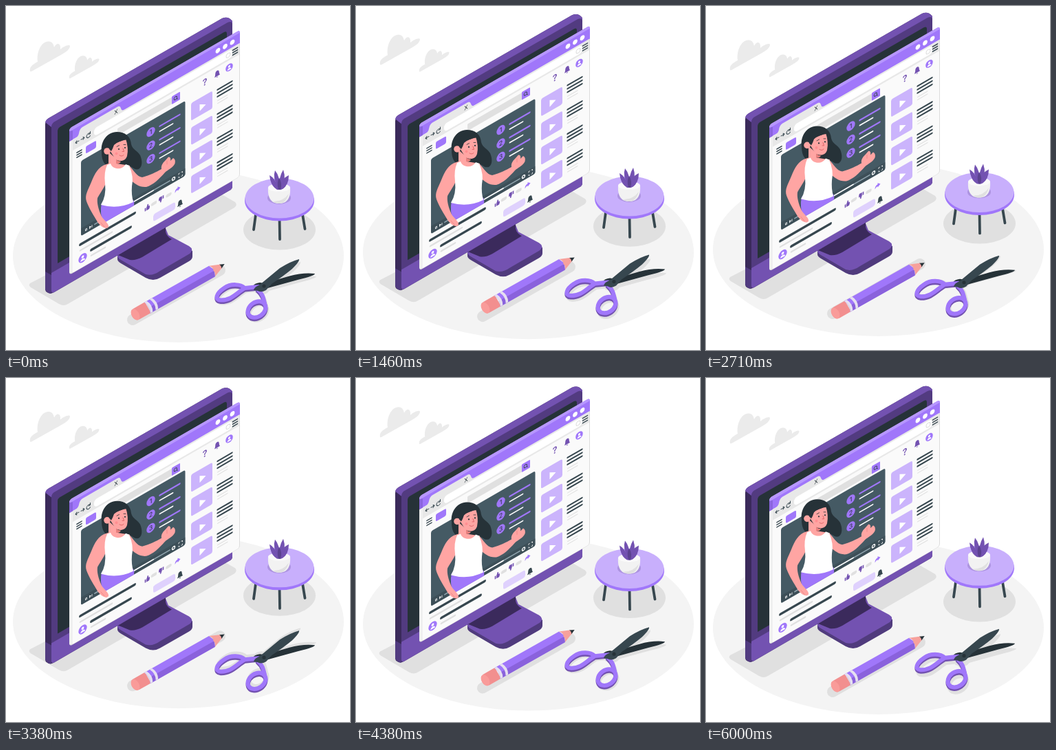
Write an HTML page that moves like this. It is 500 px wide and 500 px high and loops after 6040 ms.

```html
<!DOCTYPE html>
<html lang="en">
<head>
<meta charset="utf-8">
<title>Video tutorial</title>
<style>
  html, body { margin: 0; width: 100%; height: 100%; overflow: hidden; background: #fff; }
  svg { display: block; width: 100vw; height: 100vh; }
  text { font-family: Inter, Arial, sans-serif; text-anchor: middle; }
  .line { fill: none; stroke-linecap: round; stroke-linejoin: round; }
  .p { fill: #a077fa; } .mid { fill: #7352b1; } .light { fill: #cbb4fc; }
  .dark { fill: #37474f; } .ink { fill: #263238; } .skin { fill: #ffa5a3; }
  .g { fill: #e0e0e0; } .w { fill: #fff; }
  .sp { stroke: #a077fa; } .sd { stroke: #37474f; } .sg { stroke: #e0e0e0; } .sw { stroke: #fff; }
</style>
</head>
<body>
<svg viewBox="0 0 500 500">
  <defs>
    <path id="cloud" fill="#ebebeb" d="M35 95C34 89 37 86 46 81C44 66 52 51 62 51.500C68 52 69 56 70 60C74 52 80 54 79 63C83 59 92 55 93 58C93 63 87 67 80 71L39 94Q36 96 35 95Z"/>
    <g id="loops" class="line" stroke-width="6">
      <path d="M367 408L347 410C341 404 327 403 317 410C305 418 303 427 312 427.500C328 428 335 417 347 410"/>
      <path d="M366 412C373 418 374 424 376 432"/>
      <ellipse cx="364.500" cy="441" rx="14" ry="10.500" transform="rotate(-35 364.500 441)"/>
    </g>
    <path id="bladeA" d="M360 413Q361 408 369 405L398 381Q414 371 426 368Q427 371 416 382Q404 392 386 404L378 413Q371 417 366 414Z"/>
    <path id="bladeB" d="M359 407Q361 403 369 402L376 403L412 392.500Q432 387 449 389Q449 392 424 398L384 409Q370 414 362 411Z"/>
    <path id="pointer" d="M0 5V-5L9 0Z"/>
    <path id="thumb" d="M-3.300-.500H-1.600V4H-3.300ZM-.800 0L.800-4.300Q2.600-4 2-.800H4Q4.200 2.500 3 4H-.800Z"/>
    <path id="bell" d="M-4 3Q-2.800 1-2.800-1Q-2.800-5 0-5Q2.800-5 2.800-1Q2.800 1 4 3ZM-1.500 4H1.500Q0 6-1.500 4Z"/>
    <g id="user">
      <circle r="6.200" class="p"/>
      <circle cy="-1.700" r="1.900" class="w"/>
      <path class="w" d="M-3.600 4Q-3 .8 0 .8Q3 .8 3.600 4Z"/>
    </g>
  </defs>

  <!-- floor and shadows -->
  <g data-d="0" data-p="6000">
    <ellipse cx="250.500" cy="363" rx="240.500" ry="126" fill="#f4f4f4"/>
    <path class="g" d="M35 403L300 266L333 285Q337 289 332 293L90 433Q84 437 77 433L36 409Q32 406 35 403Z"/>
    <ellipse cx="397.500" cy="325" rx="52.500" ry="29.500" class="g"/>
    <path class="line sg" stroke-width="16" d="M184 456L311 384"/>
    <g transform="translate(2 4)">
      <use href="#loops" class="sg"/>
      <use href="#bladeA" class="g"/>
      <use href="#bladeB" class="g"/>
    </g>
  </g>

  <g data-d="0">
    <use href="#cloud"/>
    <use href="#cloud" transform="translate(65.750 33.750) scale(.75)"/>
  </g>

  <!-- monitor -->
  <g data-d="750">
    <path fill="#503b7d" d="M162 362V368Q162 371 167 374L203 395Q214 401 224 395L266 371Q271 368 271 364V356L236 334Z"/>
    <path class="mid" d="M162 363L232 323L236 333L266 349Q274 354 267 360L224 385Q213 393 203 390L167 369Q162 366 162 363Z"/>
    <path fill="#3b2a5c" d="M163 362L232 318V328Q233 335 241 339L198 365Q189 370 180 369Z"/>
    <path fill="#3a2a5a" d="M57 172Q57 166 62 163L314 18Q323 14 329 22V262Q329 266 325 268L70 416Q64 420 58 415L57 412Z"/>
    <path class="mid" d="M57 169Q58 165 62 163L314 18Q323 14 329 22V26L66 176Z"/>
    <path fill="#523b80" d="M66 176Q66 171 70 168.500L322 24Q329 21 329 27V262L66 412Z"/>
    <path class="ink" d="M75 181Q75 178 78 176L317 38Q321 36 321 40V232L75 374Z"/>
    <path fill="#513b80" d="M57 386L66 391V418Q60 418 57 412Z"/>
    <path class="mid" d="M66 388L329 236V262Q329 266 325 268L70 416Q66 418 66 414Z"/>
  </g>

  <!-- browser window -->
  <g data-d="500">
    <g transform="translate(92 178) skewY(-30)">
      <rect width="248" height="213" rx="4" fill="#dcdcdc"/>
      <rect x="4" y="4" width="243" height="208.500" rx="3" fill="#fafafa"/>
      <path fill="#f0f0f0" d="M0 15H5V212Q0 212 0 208Z"/>
      <path class="p" d="M0 19V4Q0 0 4 0H244Q248 0 248 4V19Z"/>
      <path fill="#b797ff" d="M0 5Q0 0 4 0H244Q248 0 248 4L5 5Z"/>
      <path fill="#8b65df" d="M0 4L5 6V19H0Z"/>
      <path fill="#e8e8e8" d="M5 19H10Q13 19 14 15Q15 9 19 9H70Q74 9 75 14Q76 19 80 19H247V35H5Z"/>
      <rect x="36" y="21" width="201" height="11.500" rx="5" class="w"/>
      <circle cx="231" cy="27" r="3" fill="none" stroke="#ddd"/>
      <g class="w"><circle cx="216" cy="11.500" r="3.400"/><circle cx="226.500" cy="11.500" r="3.400"/><circle cx="237" cy="11.500" r="3.400"/></g>
      <text x="68" y="18" font-size="8" class="ink">X</text>
      <g class="line sd" stroke-width="1">
        <path d="M14 26H9M11 24L9 26L11 28M17 26H22M20 24L22 26L20 28M30 24A3 3 0 1 0 30.500 28M30.500 22V25H28"/>
      </g>
      <path class="line sd" stroke-width="1.600" d="M237.500 23.500H244.500M237.500 27H244.500M237.500 30.500H244.500M11 41.500H18M11 45H18M11 48.500H18"/>
      <rect x="24" y="40" width="15" height="10.500" rx="2" class="p"/>
      <rect x="70" y="40.500" width="80" height="10" rx="1" class="g"/>
      <rect x="149" y="39.500" width="12" height="11.500" rx="1" class="p"/>
      <path class="line sd" stroke-width=".9" d="M157.500 48L156 46.500A2.200 2.200 0 1 0 155.800 46.700"/>
      <text x="197" y="51" font-size="13" font-weight="600" class="mid">?</text>
      <use href="#bell" x="215" y="45" class="mid"/>
      <use href="#user" transform="translate(232.500 45.500) scale(.85)"/>
      <g id="list"></g>
      <g class="line">
        <path class="sd" stroke-width="3.800" d="M16 178H95M32 195H89"/>
        <path class="sg" stroke-width="2.600" d="M16 186.500H62M32 203H52"/>
        <path class="sg" stroke-width="4.500" d="M121 180H125M142.500 180H146.500"/>
      </g>
      <use href="#user" transform="translate(19.500 199.500)"/>
      <use href="#thumb" x="113" y="180" class="mid"/>
      <use href="#thumb" transform="translate(134 180) rotate(180)" class="mid"/>
      <path class="p" d="M153.500 182.500Q153.500 177.500 157.500 177.500V175.500L161.500 179L157.500 182V180Q155 180 153.500 182.500Z"/>
      <rect x="122" y="195.500" width="32" height="10.500" rx="3" fill="#dfd1fd"/>
      <use href="#bell" x="161" y="202" class="dark"/>
    </g>
  </g>

  <!-- video with presenter -->
  <g data-d="1000">
    <g transform="translate(92 178) skewY(-30)">
      <rect x="17" y="57" width="151.500" height="109" rx="2.500" fill="#455a64"/>
      <path class="dark" d="M17 155H168.500V163.500Q168.500 166 166 166H19.500Q17 166 17 163.500Z" opacity=".55"/>
      <g id="steps"></g>
      <g class="line" stroke-width="1.800">
        <path stroke="#90a4ae" d="M37 160.500H146"/>
        <path class="sw" d="M92 160.500H122"/>
        <circle cx="151.500" cy="160.500" r="2" stroke-width="1.500" class="sw"/>
        <path class="sw" stroke-width=".8" d="M159 159V157.500H160.500M163 157.500H164.500V159M164.500 162V163.500H163M160.500 163.500H159V162M29.500 159.500L31.500 161L29.500 162.500ZM33 159.500V162.500M23.500 160V162.300H25.500V160Z"/>
      </g>
    </g>
    <path class="ink" d="M139 212C137 197 147 183 161 183C174 183 181 190 182 201C184 209 191 210 195 217C198 224 199 233 193 237C187 239 182 233 177 231L150 234C141 230 139 222 139 212Z"/>
    <path class="skin" d="M179 232C186 239 190 248 198 249C209 246 219 241 226 237C225 231 229 227 232 224L236 219.500Q240 219 239 225L243 221Q247 223 245.500 229C243 235 235 238 231 242C222 252 214 260 204 263C194 264 187 258 181 253Z"/>
    <path class="p" d="M139 286L184 281Q187 284 186 290L141 316Q136 300 139 286Z"/>
    <path class="skin" d="M146 230C134 233 129 244 124 256C119 268 114 275 117 284C121 295 128 305 133 314C138 321 146 326 149 321C150 317 143 312 139 306C134 295 132 286 133 279C138 270 143 264 147 253L152 240H177L180 232L161 229L160 222L149 212V229Z"/>
    <path class="w" d="M147 231L152 229C155 238 169 239 174 230L179 232Q186 248 183 262Q182 274 185 285Q163 296 138 289Q146 276 144 258Q142 242 147 231Z"/>
    <path class="skin" d="M151 210C151 199 162 200 174 193Q178.500 206 176 218C174 225 167 227 159 223Z"/>
    <path fill="#e9807e" d="M160 223Q163 226 167 226Q165 230 160 229Z"/>
    <circle cx="147" cy="211" r="4.800" class="skin"/>
    <path class="ink" d="M150 208Q148 194 160 187Q174 186 177 194Q163 196 157 202Q155 208 153 211Z"/>
    <circle cx="164" cy="208" r="1.100" class="ink"/><circle cx="173" cy="206" r="1.100" class="ink"/>
    <circle cx="160.500" cy="214.500" r="2" fill="#ff8e91"/>
    <path class="line" stroke="#263238" stroke-width=".8" d="M161 204.500L164.500 202.500M171 201.500L174 201.500"/>
    <path class="line" stroke="#d85e62" stroke-width=".9" d="M170 207L171.500 211.500H169M165 217Q168.500 219.500 171 216.500"/>
    <path class="line" stroke="#e9807e" stroke-width=".7" d="M234 225L234 230M138 315L143 321"/>
  </g>

  <!-- table and plant -->
  <g data-d="1000">
    <path class="line sd" stroke-width="3.800" d="M363 303L360 325M397.500 308L398 339M431 303L434.500 324"/>
    <ellipse cx="397.500" cy="283" rx="50.500" ry="29.500" class="p"/>
    <ellipse cx="397.500" cy="279.500" rx="50" ry="29" fill="#c8affc"/>
    <ellipse cx="397" cy="279" rx="17" ry="9" fill="#ad94e0"/>
    <path fill="#f2f2f2" d="M381 264C380 280 386 287 397 287C408 287 414 280 413 264Q397 254 381 264Z"/>
    <path fill="#e0e0e0" d="M388 284Q402 285 411 273Q407 287 397 287Q392 287 388 284Z"/>
    <ellipse cx="397" cy="264" rx="16" ry="6" fill="#fafafa"/>
    <g class="mid">
      <path d="M394 266Q384 260 383 246Q391 250 396 265ZM399 266Q398 252 411 246Q411 260 402 266Z"/>
      <path d="M396 266Q387 250 391 239Q398 247 399 266ZM397 266Q396 249 403 238Q408 252 400 266Z"/>
      <path d="M394 267Q386 262 385 254Q394 257 398 267ZM397 267Q399 257 409 254Q408 263 400 267Z"/>
      <path fill="#5b4290" d="M396 267Q393 256 397 250Q402 258 399 267Z"/>
    </g>
  </g>

  <!-- pencil -->
  <g data-d="0">
    <g transform="translate(188 448.500) rotate(-29.500)">
      <path fill="#f28f8f" d="M2-9H21V9H2Q-5 8-5 0Q-5-8 2-9Z"/>
      <ellipse rx="5.500" ry="8.800" fill="#f99b99"/>
      <path class="p" d="M20-9H128L132 0L128 9H20Q25 0 20-9Z"/>
      <path fill="#8a62dc" d="M23 1H131L128 9H20Q23 5 23 1Z"/>
      <path fill="#e6e0f0" d="M20-9H24Q29 0 24 9H20Q25 0 20-9ZM29-9H33Q38 0 33 9H29Q34 0 29-9Z"/>
      <path fill="#f7a19c" d="M128-9L144-2.500V2.500L128 9Q132 4 130 1Q133-4 128-9Z"/>
      <path class="ink" d="M142-3.300L149 0L142 3.300Q144 0 142-3.300Z"/>
    </g>
  </g>

  <!-- scissors -->
  <g data-d="500">
    <use href="#bladeB" class="ink"/>
    <use href="#loops" y="2.500" stroke="#7352b1"/>
    <use href="#loops" class="sp"/>
    <use href="#bladeA" class="dark"/>
    <circle cx="375" cy="407" r="2.600" class="ink"/>
  </g>
</svg>
<script>
  const repeat = (id, n, make) => {
    document.getElementById(id).innerHTML = Array.from({ length: n }, (_, i) => make(i)).join('');
  };

  repeat('list', 4, i => `<g transform="translate(0 ${i * 35.3})">
    <rect x="177" y="65.500" width="31" height="25.500" rx="2.500" class="light"/>
    <use href="#pointer" x="189.500" y="79.500" class="w"/>
    <path class="line sd" stroke-width="2.300" d="M215.500 68H236.500M215.500 73H236.500M215.500 78H236.500"/>
    <path class="line sg" stroke-width="1.200" d="M215.500 84H230M215.500 88H230"/></g>`);

  repeat('steps', 3, i => `<g transform="translate(118.500 ${73.5 + i * 19.5})">
    <circle r="6.200" class="p"/>
    <text y="3.200" font-size="9" class="ink">${i + 1}</text>
    <path class="line sp" stroke-width="2.400" d="M13-1H42"/>
    <path class="line sw" stroke-width="1.800" d="M13 6.500H32"/></g>`);

  // Each group floats up 10 px and back at constant speed, after its own delay.
  const floats = [...document.querySelectorAll('[data-d]')].map(el => ({
    el, delay: +el.dataset.d, period: +(el.dataset.p || 3000)
  }));

  function draw(now) {
    const t = now % 6040;
    for (const { el, delay, period } of floats) {
      const u = Math.max(0, t - delay) % period / period;
      el.setAttribute('transform', `translate(0 ${-20 * Math.min(u, 1 - u)})`);
    }
  }

  const start = performance.now();
  (function tick() {
    draw(performance.now() - start);
    requestAnimationFrame(tick);
  })();
</script>
</body>
</html>
```
